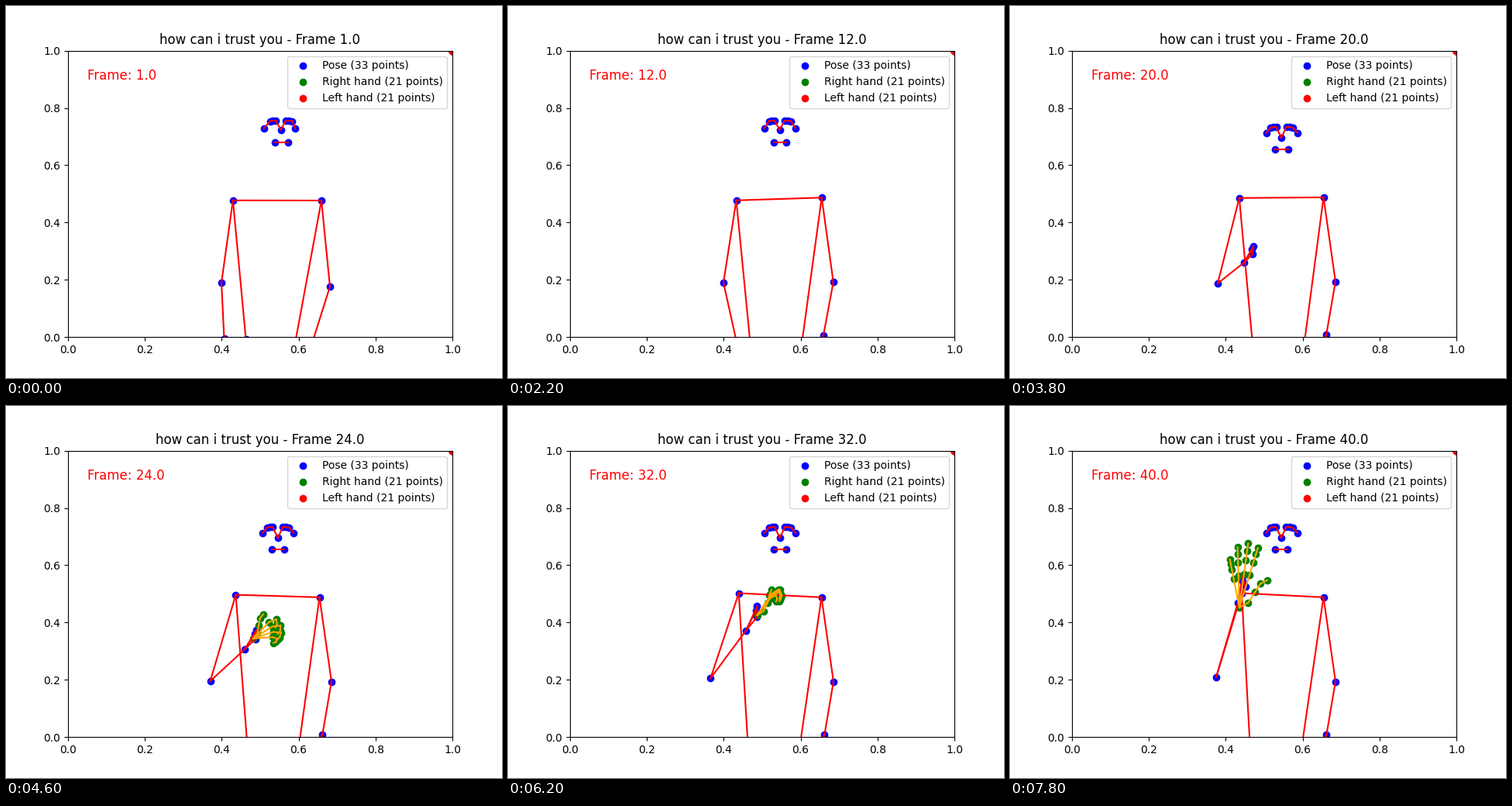
Recreate the animation shown at these times as a matplotlib script. Size 640 by 480 pixels, loop 8 s.

```python
import numpy as np
import matplotlib.pyplot as plt
from matplotlib.animation import FuncAnimation

FRAMES, INTERVAL = 40, 200
LEFT, BOTTOM, WIDTH, HEIGHT = 80, 427.2, 496, 369.6  # axes box in pixels

# Point order: 11 head points, then shoulder, elbow, wrist, 3 fingers, hip per side
RIGHT, LEFT_SIDE = 11, 18
SIDE_EDGES = [(0, 1), (1, 2), (2, 3), (2, 4), (2, 5), (3, 4), (0, 6)]
POSE_EDGES = [(k, k + 1) for k in range(8)] + [(9, 10)]
POSE_EDGES += [(s + a, s + b) for s in (RIGHT, LEFT_SIDE) for a, b in SIDE_EDGES]
POSE_EDGES += [(RIGHT, LEFT_SIDE), (RIGHT + 6, LEFT_SIDE + 6)]
HAND_EDGES = [(0 if k % 4 == 1 else k - 1, k) for k in range(1, 21)]

# Key poses of the raised arm; reach is (angle, length) of the index finger
ELBOW = {11: (278, 357), 19: (268, 358), 27: (259, 352), 39: (266, 350)}
WRIST = {0: (281.5, 429), 5: (293, 430), 11: (295.5, 436), 19: (302, 331),
         27: (314, 297), 34: (302, 284), 39: (294, 254)}
REACH = {11: (-70, 22), 19: (60, 24), 27: (58, 34), 39: (80, 35)}

# Hand: offset from wrist, angle, size, spread, curl, thumb lift, thumb tuck
HAND = {27: (11, -14, 25, 0.67, -14, 1, 85, 0),
        34: (17, -24, 76, 0.81, 8, 1, 0, 1),
        39: (2, 6, 87, 1, 9.5, 0, 0, 0)}
HAND_START = 21
CORNER = np.ones((21, 2))  # an undetected hand sits in the corner


def track(i, keys):
    return np.array([np.interp(i, list(keys), v) for v in zip(*keys.values())])


def smooth(i, a, b):
    t = np.clip((i - a) / (b - a), 0, 1)
    return t * t * (3 - 2 * t)


def polar(angle, length):
    a = np.radians(angle)
    return np.array([np.cos(a), -np.sin(a)]) * length


def to_data(pts):
    x, y = np.array(pts).T
    return np.column_stack([(x - LEFT) / WIDTH, (BOTTOM - y) / HEIGHT])


def head_at(i, settle):
    nod = smooth(i, 11, 19)
    x = 350 + 4.6 * settle + 2 * np.exp(-((i - 27) / 4) ** 2)
    y = 148 + 8.4 * nod
    ear_x, ear_y = 351 + 0.5 * (x - 351), y + 10 - 2.6 * nod
    eyes = [(x + dx, y + 0.5 * (abs(dx) > 12)) for dx in (-14, -10.2, -6.6, 6.4, 10.5, 14.6)]
    nose = (x, y + 11.5 + 2.2 * nod)
    mouth = [(x + dx, y + 28.3) for dx in (-8, 8.4 + settle)]
    return [(ear_x - 20, ear_y), *eyes[:3], nose, *eyes[3:], (ear_x + 20.3, ear_y), *mouth]


def fingers(wrist, angle, length, side):
    fan = [(-15, 0.65), (0, 1), (-2, 0.82)]  # pinky, index, thumb
    return [wrist + polar(angle + side * turn, length * r) for turn, r in fan]


def pose_at(i):
    settle = np.exp(-i / 5)
    lift, sway = smooth(i, 14, 27), smooth(i, 19, 27)
    wrist = track(i, WRIST)
    right = [(292.8 + 0.16 * i, 250.8 - 9.3 * lift), track(i, ELBOW), wrist,
             *fingers(wrist, *track(i, REACH), 1),
             (313.5 - 4 * settle - 3.7 * sway, 441 - 11.5 * settle)]
    wrist = np.array([408.5 - 13.5 * settle, 423.5 + 11.5 * settle])
    left = [(404.5 + 2.5 * settle, 246.8 + 4.2 * settle),
            (420 - 2 * settle, 355.5 + 6.5 * settle), wrist,
            *fingers(wrist, -122, 19, -1),
            (378.5 - 7.5 * settle - 3 * sway, 446)]
    return to_data(head_at(i, settle) + right + left)


def hand_at(i):
    if i < HAND_START:
        return CORNER
    dx, dy, angle, size, spread, curl, lift, tuck = track(i, HAND)
    wrist = track(i, WRIST) + [dx, dy]
    pts = [wrist]
    for k, length in enumerate((13, 16, 13, 10)):
        bend = -30 - 28 * (k in (0, 3)) + lift + 7 * k * k * tuck
        pts.append(pts[-1] + polar(angle + bend, length * size))
    for f in range(4):
        base = angle + spread * (f - 1.5)
        scale = size * (1.1 - 0.1 * (f - 1) ** 2) * (1 - 0.15 * curl)
        pts.append(wrist + polar(base, (44 - 0.7 * f * f) * size))
        for length, bend in ((17, 0.2), (11, 1), (8.5, 1.3)):
            pts.append(pts[-1] + polar(base - 125 * curl * bend, length * scale))
    return to_data(pts)


fig, ax = plt.subplots(figsize=(6.4, 4.8), dpi=100)
ax.set_xlim(0, 1)
ax.set_ylim(0, 1)

pose_dots = ax.scatter(*pose_at(0).T, c="blue", label="Pose (33 points)")
right_dots = ax.scatter(*CORNER.T, c="green", label="Right hand (21 points)")
ax.scatter(*CORNER.T, c="red", label="Left hand (21 points)")
pose_lines = [ax.plot([], [], color="red")[0] for _ in POSE_EDGES]
hand_lines = [ax.plot([], [], color="orange")[0] for _ in HAND_EDGES]
counter = ax.text(0.05, 0.9, "", fontsize=12, color="red")
ax.legend(loc="upper right")


def connect(lines, edges, pts):
    for line, (a, b) in zip(lines, edges):
        line.set_data(pts[[a, b], 0], pts[[a, b], 1])


def update(i):
    pose, hand = pose_at(i), hand_at(i)
    pose_dots.set_offsets(pose)
    right_dots.set_offsets(hand)
    connect(pose_lines, POSE_EDGES, pose)
    connect(hand_lines, HAND_EDGES, hand)
    for line in hand_lines:
        line.set_visible(i >= HAND_START)
    ax.set_title(f"how can i trust you - Frame {i + 1:.1f}")
    counter.set_text(f"Frame: {i + 1:.1f}")


anim = FuncAnimation(fig, update, frames=FRAMES, interval=INTERVAL,
                     repeat=True, repeat_delay=0)
plt.show()
```
